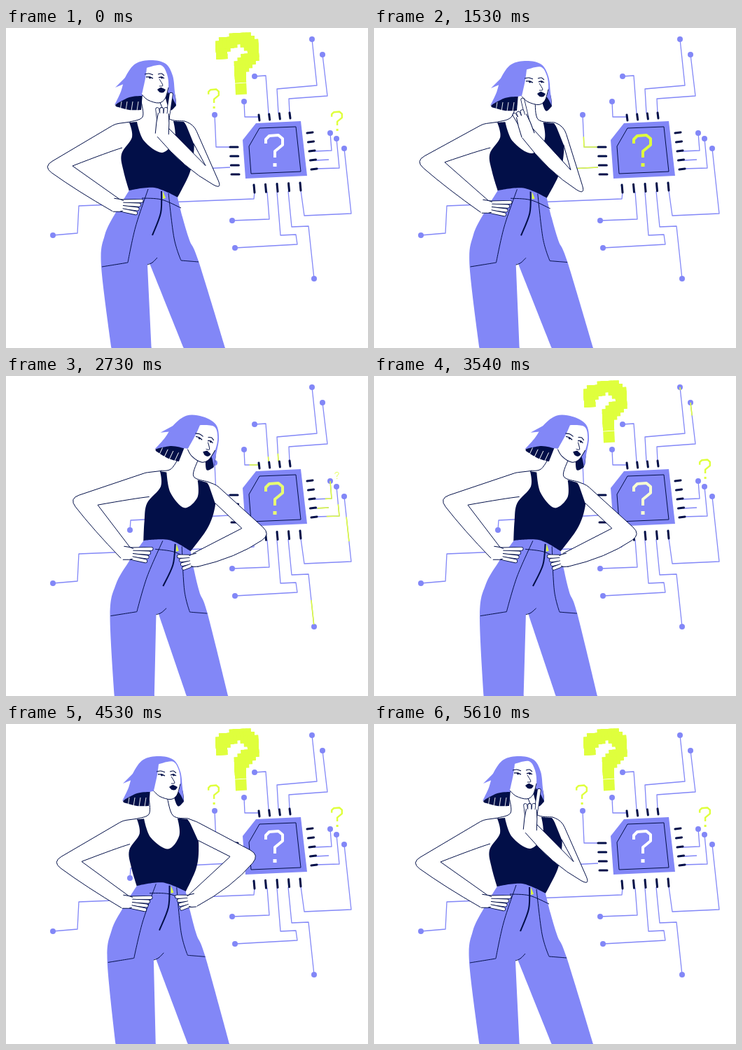
Recreate the animation shown at these times as an HTML page with a canvas. Size 517 px wide and 457 px high, loop 5.64 s.

```html
<!DOCTYPE html>
<html lang="en">
<head>
<meta charset="utf-8">
<title>Thinking about a chip</title>
<style>
html, body { margin: 0; width: 100%; height: 100%; overflow: hidden; background: #fff; }
canvas { display: block; width: 517px; height: 457px; }
</style>
</head>
<body>
<canvas id="stage" width="517" height="457"></canvas>
<script>
const LOOP = 5640;
const NAVY = '#020f48', VIOLET = '#8287f7', LIME = '#dfff3d', WHITE = '#fff';
const g = document.getElementById('stage').getContext('2d');
g.lineJoin = 'round';

// "x,y x,y*" -> points; a star marks a sharp corner
const pts = s => s.split(' ').map(p => {
  const [x, y] = p.replace('*', '').split(',').map(Number);
  return [x, y, p.endsWith('*') ? 1 : 0];
});
const clamp = v => Math.min(1, Math.max(0, v));
const ramp = (t, a, b) => clamp((t - a) / (b - a));
const ease = k => k < .5 ? 4 * k ** 3 : 1 - (2 - 2 * k) ** 3 / 2;
const back = k => 1 + 2.7 * (k - 1) ** 3 + 1.7 * (k - 1) ** 2;
const add = (a, b, k = 1) => [a[0] + b[0] * k, a[1] + b[1] * k];
const sub = (a, b) => add(a, b, -1);
const unit = v => { const n = Math.hypot(...v) || 1; return [v[0] / n, v[1] / n]; };
function mix(a, b, k) {
  if (typeof a === 'number') return a + (b - a) * k;
  if (Array.isArray(a)) return a.map((v, i) => mix(v, b[i], k));
  return Object.fromEntries(Object.keys(a).map(n => [n, mix(a[n], b[n], k)]));
}

// ---------- poses: joints only, the outlines follow from them ----------
// left and right joints come in pairs; grip = angle, palm, finger and index length
const think = {
  shoulders: [[176, 135], [254, 134]], waist: [[176, 232], [245, 242]],
  elbows: [[53, 198], [309, 231]], wrists: [[157, 253], [223, 148]],
  head: [205, 80], turn: 0, look: [0, 0], foot: 0, grip: [-1.5, 26, 7, 28]
};
const ponder = {
  ...think, shoulders: [[176, 135], [257, 136]], waist: [[177, 232], [247, 243]],
  elbows: [[59, 190], [302, 239]], wrists: [[158, 255], [219, 150]],
  head: [216, 81], look: [6, 5], grip: [-1.9, 26, 6, 21]
};
const lean = {
  shoulders: [[220, 136], [287, 152]], waist: [[196, 235], [264, 251]],
  elbows: [[90, 175], [378, 226]], wrists: [[171, 253], [270, 263]],
  head: [269, 90], turn: .29, look: [6, 6], foot: 4, grip: [-3.3, 7, 14, 15]
};
const akimbo = {
  ...lean, shoulders: [[187, 136], [259, 136]], waist: [[187, 231], [257, 239]],
  elbows: [[66, 197], [362, 187]], wrists: [[170, 254], [267, 252]],
  head: [216, 80], turn: 0, look: [6, 2], foot: 6
};
function slide(pose, dx, dy) {
  const pair = list => list.map(p => add(p, [dx, dy]));
  return {
    ...pose, shoulders: pair(pose.shoulders), waist: pair(pose.waist), elbows: pair(pose.elbows),
    wrists: pair(pose.wrists), head: add(pose.head, [dx, dy]), foot: pose.foot + dx * .6
  };
}
const beats = [[0, think], [560, slide(think, -17, 2)], [1130, slide(think, -17, 2)],
  [1500, ponder], [2250, ponder], [2700, lean], [3600, slide(lean, 3, 0)],
  [4130, akimbo], [4620, akimbo], [5180, think], [LOOP, think]];

function poseAt(t) {
  const i = beats.findIndex(b => b[0] > t);
  const [t0, a] = beats[i - 1], [t1, b] = beats[i];
  return mix(a, b, ease(ramp(t, t0, t1)));
}
// carries points drawn for the thinking pose along with shoulders, waist and feet
function warp(list, pose) {
  const shift = (name, u) => {
    const [l, r] = pose[name].map((p, i) => sub(p, think[name][i]));
    return mix(l, r, u);
  };
  return list.map(([x, y, corner]) => {
    const u = ramp(x, 176, 250), hip = shift('waist', u);
    const d = y < 235 ? mix(shift('shoulders', u), hip, ramp(y, 134, 234) ** 1.5)
      : mix(hip, [pose.foot, 0], ramp(y, 235, 460));
    return [x + d[0], y + d[1], corner];
  });
}

// ---------- drawing helpers ----------
function trace(list, closed) {
  const n = list.length;
  const at = i => closed ? list[(i + n) % n] : list[Math.min(n - 1, Math.max(0, i))];
  const slope = i => {
    const s = (1 - at(i)[2]) / 6;
    return sub(at(i + 1), at(i - 1)).map(v => v * s);
  };
  g.beginPath();
  g.moveTo(list[0][0], list[0][1]);
  for (let i = 0; i < n - (closed ? 0 : 1); i++) {
    const q = at(i + 1);
    g.bezierCurveTo(...add(at(i), slope(i)), ...sub(q, slope(i + 1)), q[0], q[1]);
  }
}
function blob(list, color) {
  trace(list, true);
  g.fillStyle = color; g.fill();
}
function line(list, width = 1) {
  trace(list, false);
  g.strokeStyle = NAVY; g.lineWidth = width; g.stroke();
}
function poly(list, color, width) {
  g.beginPath();
  list.forEach(p => g.lineTo(p[0], p[1]));
  if (width) { g.strokeStyle = color; g.lineWidth = width; g.stroke(); }
  else { g.fillStyle = color; g.fill(); }
}
function dot(x, y, r, color) {
  g.beginPath(); g.arc(x, y, r, 0, 7);
  g.fillStyle = color; g.fill();
}

// ---------- circuit ----------
// route from outer end to chip, start of its pulse, whether the pulse runs inward
const wires = [
  ['437,16 444,82 387,87 389,122', 2680], ['452,38 459,97 404,101 405,122', 2850],
  ['355,69 371,68 375,122', 2700], ['340,105 341,127 361,127', 2670],
  ['298,124 300,170 320,170', 1230, true], ['177,220 178,206 320,199', 820, true],
  ['67,296 102,293 104,254 354,244 355,234', 2700], ['323,275 376,273 373,234', 1600],
  ['327,314 416,309 414,295 392,296 387,234', 1560], ['440,358 432,283 408,284 403,233', 2060],
  ['483,172 493,265 426,268 421,232', 1970], ['463,150 465,175 440,176', 2500],
  ['472,158 476,200 442,201', 2500], ['461,188 442,189', 2560]
].map(([route, start, inward]) => {
  const path = pts(route);
  return { path, start, run: inward ? path : [...path].reverse(), bare: path.length < 3 };
});
const chip = pts('357,136 421,133 430,211 342,215 338,160');
const chipRim = pts('362,143 414,141 421,205 350,208 347,169 362,143');
// question mark measured from its foot
const hook = pts('-12,-33 -12,-39 -7,-44 6,-45 12,-40 12,-31 1,-22 1,-13');

function pinRow(count, from, to, [dx, dy]) {
  for (let i = 0; i < count; i++) {
    const [x, y] = mix(from, to, i / (count - 1));
    poly([[x, y], [x + dx, y + dy]], NAVY, 3);
  }
}
function query(x, y, size, color) {
  if (size <= 0) return;
  g.save();
  g.translate(x, y); g.scale(size, size);
  poly(hook, color, 4);
  g.fillStyle = color; g.fillRect(-1.5, -5, 5, 5);
  g.restore();
}
// the same mark stamped with squares on a coarse grid
function bigQuery(size) {
  if (size <= 0) return;
  const snap = v => Math.round(v / 5) * 5;
  g.save();
  g.translate(336, 95); g.scale(size, size); g.rotate(-.05);
  g.fillStyle = LIME;
  for (let i = 0; i < hook.length - 1; i += .125) {
    const [x, y] = mix(hook[Math.floor(i)], hook[Math.floor(i) + 1], i % 1);
    g.fillRect(snap(x * 1.9 - 3) - 8, snap(y * 1.75) - 8, 16, 16);
  }
  g.fillRect(-8, -16, 16, 16);
  g.restore();
}
function circuit(t) {
  g.lineCap = 'butt';
  for (const { path, start, run, bare } of wires) {
    poly(path, VIOLET, 1.3);
    if (!bare) dot(path[0][0], path[0][1], 4, VIOLET);
    const head = (t - start) * .22;
    if (head > 0 && head < 400) {
      const shown = Math.min(head, 35);
      g.setLineDash([shown, 2000]);
      g.lineDashOffset = shown - head;
      poly(run, LIME, 1.6);
      g.setLineDash([]);
    }
  }
  g.lineCap = 'round';
  pinRow(4, [320, 170], [322, 209], [11, 0]);
  pinRow(5, [430, 150], [436, 202], [8, -1]);
  pinRow(4, [361, 124], [405, 121], [1, 8]);
  pinRow(5, [354, 224], [420, 221], [1, 11]);
  g.lineCap = 'butt';
  poly(chip, VIOLET);
  poly(chipRim, NAVY, 1);
  const glow = ramp(t, 900, 1450) * (1 - ramp(t, 2300, 3900));
  query(383, 198, 1, `rgb(${mix([255, 255, 255], [223, 255, 61], glow)})`);

  const sizeOf = (on, off) => t < on ? 1 - ease(ramp(t, off, off + 280)) : back(ramp(t, on, on + 370));
  bigQuery(sizeOf(3030, 460));
  query(296.5, 115, .61 * sizeOf(3400, 400), LIME);
  query(472.5, 147, .61 * sizeOf(2700, 430), LIME);
}

// ---------- figure, drawn in the thinking pose ----------
const vest = pts('176,135* 180,156 165,180 168,205 176,233* 210,229 245,242* 262,208 268,180 267,156 254,134* 239,133* 241,158 223,178 197,161 187,134*');
const slacks = pts('176,232* 157,263 141,296 136,340 151,460* 208,460* 202,338* 205,336* 255,460* 314,460* 275,333 262,303 252,270 245,242* 212,228');
const seams = ['203,230 185,284 174,335* 137,341', '232,236 240,300 250,332* 275,334',
  '202,338 209,335 216,328', '194,243 222,245 250,257'].map(pts);
const fly = pts('222,233 221,264 209,296');
const hairBack = pts('156,110* 175,95 195,94* 193,117* 176,117 157,112*');
const hairSide = pts('229,86 240,92 243,108 241,113 234,117 228,100');
const hair = pts('155,110* 164,91 171,69 185,51 207,46 228,51 238,68 241,91 243,110* 237,99 230,90* 194,97* 176,99');
const wisp = pts('172,69 156,85 168,80');
const face = pts('201,57* 199,72 194,95* 203,103 218,107 227,101 232,85 230,66 221,53');
const lips = pts('216,88* 221,85 224,86 228,88* 225,92 220,92');
const brows = ['198,66 204,65 210,67', '217,66 222,65 226,68'].map(pts);
const lids = ['200,70 205,70 210,72', '218,71 222,70 226,72'].map(pts);
const nose = pts('219,73 224,82 219,83');

function head({ head: [x, y], turn, look }) {
  g.save();
  g.translate(x, y); g.rotate(turn); g.translate(-205, -80);
  blob(hairBack, NAVY);
  for (let i = 0; i < 4; i++) poly([[163 + i * 8, 118], [165 + i * 8, 105]], WHITE, .9);
  blob(hairSide, NAVY);
  blob(hair, VIOLET);
  poly(wisp, VIOLET);
  g.translate(look[0], look[1] * .3);
  blob(face, WHITE);
  line(face.slice(2, 7));
  g.translate(0, look[1] * .7);
  brows.forEach(b => line(b, 1.1));
  lids.forEach(l => { line(l, 1.3); dot(l[1][0] + .5, l[1][1] + 1, 1.4, NAVY); });
  line(nose, .9);
  blob(lips, NAVY);
  g.restore();
}
function neck(pose) {
  const { head: [x, y], turn } = pose, c = Math.cos(turn), s = Math.sin(turn);
  const under = (dx, dy) => [x + dx * c - dy * s, y + dx * s + dy * c, 0];
  const left = [under(-12, 24), ...warp(pts('195,127 177,134'), pose)];
  const right = [under(14, 24), ...warp(pts('232,129 255,133'), pose)];
  poly([...left, ...right.slice().reverse()], WHITE);
  line(left); line(right);
}
// side 0 is the left arm, 1 the right one
function arm(pose, side) {
  const elbow = pose.elbows[side], wrist = pose.wrists[side], hand = side ? -1 : 1;
  const [start, cap, pit] = warp(pts(side ? '255,133 268,138 268,165' : '178,134 156,137 166,171'), pose);
  const up = unit(sub(cap, elbow)), fore = unit(sub(wrist, elbow));
  const out = [-fore[1] * hand, fore[0] * hand];
  const bend = add(elbow, unit(add(up, fore)), 42);
  const wristOut = add(wrist, out, 10), wristIn = add(wrist, out, -10);
  const belly = add(mix(elbow, wristOut, .5), out, side ? 11 : 3);
  const outer = () => {
    g.moveTo(start[0], start[1]);
    g.arcTo(...cap.slice(0, 2), ...elbow, 25);
    g.lineTo(...add(elbow, up, 15));
    g.quadraticCurveTo(...elbow, ...add(elbow, unit(sub(belly, elbow)), 15));
    g.quadraticCurveTo(...belly, ...wristOut);
  };
  const inner = move => {
    g[move](...wristIn);
    g.lineTo(...bend);
    g.quadraticCurveTo(...add(mix(bend, pit, .65), up, side ? 0 : 6), pit[0], pit[1]);
  };
  g.beginPath(); outer(); inner('lineTo');
  g.fillStyle = WHITE; g.fill();
  g.beginPath(); outer(); inner('moveTo');
  g.strokeStyle = NAVY; g.lineWidth = 1; g.stroke();
}
function hand([x, y], [angle, palm, finger, index], flip) {
  g.save();
  g.translate(x, y); g.rotate(angle); g.scale(1, flip);
  g.lineCap = 'round';
  for (let i = 0; i < 4; i++) {
    const k = 1.5 - i, reach = palm + (i ? finger * (1 - .08 * i) : index);
    const bone = [[palm * .6, k * 4], [reach, k * 6]];
    poly(bone, NAVY, 5.8);
    poly(bone, WHITE, 4.2);
  }
  const edge = s => [[-3, 9.5 * s], [palm * .5, 9 * s], [palm, 7.5 * s]];
  poly([...edge(1), ...edge(-1).reverse()], WHITE);
  poly(edge(1), NAVY, 1); poly(edge(-1), NAVY, 1);
  g.restore();
}
function trousers(pose) {
  blob(warp(slacks, pose), VIOLET);
  seams.forEach(s => line(warp(s, pose)));
  line(warp(fly, pose), 2);
  poly(warp(pts('224,233 228,243 224,244'), pose), LIME);
}
function figure(pose) {
  neck(pose);
  arm(pose, 0);
  blob(warp(vest, pose), NAVY);
  trousers(pose);
  hand(pose.wrists[0], [.08, 10, 25, 26], -1);
  head(pose);
  arm(pose, 1);
  hand(pose.wrists[1], pose.grip, 1);
}

const born = performance.now();
function frame() {
  const t = (performance.now() - born) % LOOP;
  g.fillStyle = WHITE;
  g.fillRect(0, 0, 517, 457);
  circuit(t);
  figure(poseAt(t));
  requestAnimationFrame(frame);
}
frame();
</script>
</body>
</html>
```
